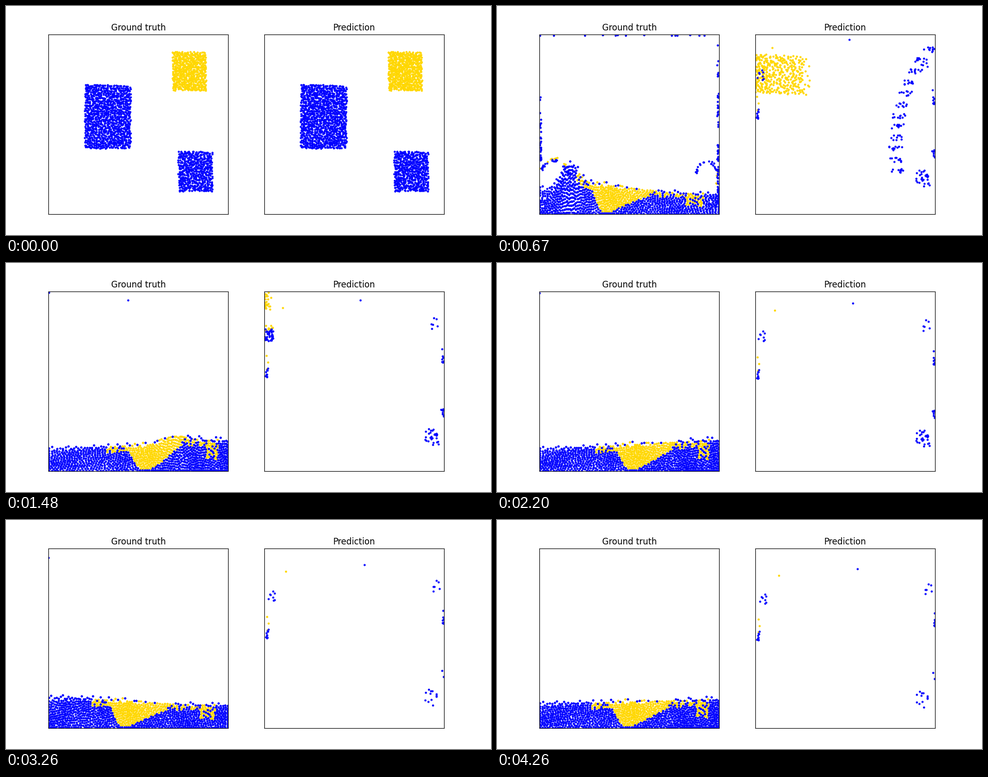
A matplotlib script for the animation above (4300 ms loop, 950 by 450 pixels).

```python
import numpy as np
import matplotlib.pyplot as plt
from matplotlib.animation import FuncAnimation

LOOP, FRAMES = 4300, 121
STEP = LOOP / FRAMES
W, H, DPI = 950, 450, 100
SIDE = 352.27
LEFT, TOP = 83.0, 56.36
RIGHT, FLOOR = LEFT + SIDE, TOP + SIDE
SHIFT = SIDE * 1.2      # distance between the two panels
HIT = 640               # ms at which the fluid has reached the floor
DEPTH = 52              # mean height of the settled fluid

rng = np.random.default_rng(4)


def smooth(a):
    a = np.clip(a, 0, 1)
    return a * a * (3 - 2 * a)


def bump(x, centre, width):
    return np.exp(-((x - centre) / width) ** 2)


def scatter(n, x, y, sx, sy):
    """n random points in a box around (x, y)."""
    return (x, y) + rng.uniform(-1, 1, (n, 2)) * (sx, sy)


def block(n, x0, y0, x1, y1):
    """n jittered points filling a rectangle."""
    w, h = x1 - x0, y1 - y0
    cols = round(np.sqrt(n * w / h))
    i = np.arange(n)
    jx, jy = rng.uniform(-0.55, 0.55, (2, n))
    x = x0 + w * (i % cols + 0.5 + jx) / cols
    y = y0 + h * ((i + 0.5) / n + jy * cols / n)
    return np.column_stack([np.clip(x, x0, x1), np.clip(y, y0, y1)])


def relaxed(n, w, h, reach=5.2, rounds=35):
    """Random points that push each other apart."""
    p = rng.random((n, 2)) * (w, h)
    for _ in range(rounds):
        d = p[:, None] - p
        r = np.hypot(d[..., 0], d[..., 1]) + 1e-6
        push = np.clip(1 - r / reach, 0, None) / r
        p = np.clip(p + (d * push[..., None]).sum(1), 1.2, (w - 1.2, h - 1.2))
    return p


def by_columns(x, y, cols=28):
    col = np.argsort(np.argsort(x)) * cols // len(x)
    return np.lexsort((y, col))


# --- settled fluid: u is the share of area to the left, v the share of height
u, v = (relaxed(1080, SIDE, DEPTH) / (SIDE, DEPTH)).T
loose = (v > 0.92) & (rng.random(u.size) < 0.5)
v = v + loose * rng.uniform(0, 0.13, u.size)

chance = rng.random(u.size)
sand = v > np.interp(u, [.36, .44, .5, .58, .7], [1, .08, .1, .35, .75], left=9, right=9)
sand |= (abs(u - 0.57) < 0.3) & (abs(v - 0.87) < 0.11) & (chance < 0.5)
sand |= (abs(u - 0.9) < 0.035) & (v > 0.35) & (chance < 0.6)
sand &= ~loose | (chance < 0.25)

# two particles share each site
u, v, sand = np.tile(u, 2), np.tile(v, 2), np.tile(sand, 2)
N = u.size
GRID = np.linspace(0, 1, 353)


def surface(t):
    """Slow slosh plus a crest that runs to the right and flattens."""
    age = max(t - HIT, 0)
    slosh = 17 * np.exp(-t / 4000) * np.cos(2 * np.pi * (t - 450) / 2800)
    c = 0.17 + age / 1550
    crest = bump(GRID, c, 0.065 + age / 12000) - 0.45 * bump(GRID, c - 0.13, 0.08)
    return DEPTH + slosh * np.cos(np.pi * GRID) + 34 * np.exp(-age / 850) * crest


def bed(t):
    h = surface(t)
    area = np.concatenate([[0], np.cumsum((h[1:] + h[:-1]) / 2)])
    x = np.interp(u, area / area[-1], GRID)
    return np.column_stack([LEFT + SIDE * x, FLOOR - v * np.interp(x, GRID, h)])


# --- starting blocks, each matched to its part of the bed
gold = np.flatnonzero(sand)
blue = np.flatnonzero(~sand)
blue = blue[np.argsort(u[blue])]
big, small = np.split(blue, [int(len(blue) * 0.68)])

start, speed = np.zeros((N, 2)), np.zeros(N)
for ids, box, vx in [(big, (154, 155, 244, 280), 0.30),
                     (gold, (326, 90, 392, 166), -0.32),
                     (small, (337, 286, 404, 364), 0.12)]:
    pts = block(len(ids), *box)
    start[ids[by_columns(u[ids], -v[ids])]] = pts[by_columns(*pts.T)]
    speed[ids] = vx


# --- drops thrown on walls and ceiling when the fluid hits
def wall(n, x, y0, y1, power):
    y = y0 + (y1 - y0) * rng.power(power, n)
    return np.column_stack([x + rng.uniform(-1.5, 1.5, n), y])


def arc(n, x, y, radius):
    a = np.pi * rng.random(n)
    r = radius + rng.uniform(-3, 3, n)
    return np.column_stack([x + r * np.cos(a), y - r * np.sin(a)])


blue_drops = np.vstack([
    wall(30, LEFT + 2, 100, 305, 3), wall(75, RIGHT - 2.5, 70, 395, 1.8),
    scatter(12, 260, TOP + 1.5, 165, 1), arc(30, 112, 329, 25), arc(24, 411, 328, 21)])
gold_drops = np.vstack([arc(12, 112, 326, 27), wall(4, RIGHT - 5, 315, 350, 1)])

thrown = np.zeros(N, bool)
landing = np.zeros((N, 2))
for ids, drops in [(blue, blue_drops), (gold, gold_drops)]:
    pick = rng.choice(ids, len(drops), replace=False)
    thrown[pick], landing[pick] = True, drops

# two late drops: times, x, y
LATE = [([0, HIT, 1480, 1950], [200, 288, 238, 205], [200, 57, 73, 370]),
        ([0, HIT, 2830, 3690, 4050], [180, 84, 83, 83, 83], [210, 58, 59, 90, 390])]


def truth(t):
    target = bed(t)
    fall = np.clip((t - HIT) / 450, 0, 1) ** 2
    target[thrown] = landing[thrown] * (1 - fall) + target[thrown] * fall
    lo, hi = LEFT + 2, RIGHT - 2
    x = start[:, 0] + speed * t
    x = np.where(x < lo, 2 * lo - x, x)
    x = np.where(x > hi, 2 * hi - x, x)
    y = np.minimum(start[:, 1] + 0.00088 * t * t, FLOOR - 3)
    w = smooth((t - 170) / (HIT - 180))
    pos = np.column_stack([x, y]) * (1 - w) + target * w
    late = [(np.interp(t, T, X), np.interp(t, T, Y)) for T, X, Y in LATE]
    return pos[gold], np.vstack([pos[blue], late])


# --- prediction: blocks fly out of the box, a few stragglers drift on
class Stragglers:
    """Clumps of (count, staying, x, y, half width, half height) at 1480 ms."""

    def __init__(self, ids, clumps):
        self.at = np.vstack([scatter(n, *box) for n, _, *box in clumps])
        order = np.concatenate([np.arange(n) - stay for n, stay, *_ in clumps])
        self.side = np.sign(self.at[:, 0] - SHIFT - (LEFT + RIGHT) / 2)
        self.leaving = order >= 0
        self.first = origin(ids, len(self.at))

    def __call__(self, t):
        s = (max(t, HIT) - 1480) / 1000
        lift = np.exp((TOP - self.at[:, 1]) / 60)
        pos = self.at + np.column_stack([6 * lift, 4 + 6 * lift]) * s
        hold = np.where(self.side > 0, 0.85, 0)
        pos[:, 0] += self.leaving * self.side * 75 * np.clip(abs(s) - hold, 0, None)
        return travel(self.first, pos, t)


def origin(ids, n):
    return start[rng.choice(ids, n, replace=False)] + (SHIFT, 0)


def travel(first, pos, t):
    w = min(t / HIT, 1)
    return first * (1 - w) + pos * w


blue_stragglers = Stragglers(blue, [
    (1, 1, 694, 73, 0, 0), (6, 6, 838, 124, 8, 25), (8, 8, 856, 181, 2, 15),
    (30, 12, 834, 342, 13, 16), (8, 2, 855, 294, 3, 8),
    (48, 8, 515, 142, 9, 12), (9, 9, 510, 215, 3, 10)])
gold_stragglers = Stragglers(gold, [
    (28, 0, 514, 74, 7, 17), (12, 0, 516, 127, 8, 5),
    (1, 1, 542, 88, 0, 0), (3, 3, 511, 186, 2, 24)])

# ragged trailing edge of the blue blocks
fringe = np.vstack([scatter(10, 780 + 0.0017 * (y - 280) ** 2, y, 13, 5)
                    for y in np.linspace(85, 323, 12)])
fringe_first = origin(big, len(fringe))

exit_speed = np.where(start[blue, 0] < 300, 0.52, 0.21)
lag = rng.exponential(5, len(gold))


def prediction(t):
    g = start[gold] + (SHIFT, 0)
    share = (g[:, 0] - g[:, 0].min()) / np.ptp(g[:, 0])
    goal = 478 + 121 * share ** 1.5 + lag
    g += np.column_stack([goal - g[:, 0], 2 + 6 * share]) * t / HIT
    b = start[blue] + (SHIFT, 0)
    b += np.column_stack([exit_speed * t, np.full(len(b), 0.03 * t)])
    trail = travel(fringe_first, fringe + (0.16 * max(t - HIT, 0), 0), t)
    return (np.vstack([g, gold_stragglers(t)]),
            np.vstack([b, blue_stragglers(t), trail]))


# --- drawing
fig = plt.figure(figsize=(W / DPI, H / DPI), dpi=DPI, facecolor="white")


def panel(x, title):
    ax = fig.add_axes([x / W, 1 - FLOOR / H, SIDE / W, SIDE / H])
    ax.set(xlim=(x, x + SIDE), ylim=(FLOOR, TOP), xticks=[], yticks=[])
    ax.set_title(title, fontsize=12, family="DejaVu Sans")
    return [ax.plot([], [], "o", ms=2, color=col)[0] for col in ("gold", "blue")]


panels = [(panel(LEFT, "Ground truth"), truth),
          (panel(LEFT + SHIFT, "Prediction"), prediction)]


def draw(k):
    artists = []
    for dots, model in panels:
        for line, pts in zip(dots, model(k * STEP)):
            line.set_data(pts[:, 0], pts[:, 1])
            artists.append(line)
    return artists


anim = FuncAnimation(fig, draw, frames=FRAMES, interval=STEP, repeat=True,
                     repeat_delay=0, cache_frame_data=False)
plt.show()
```
